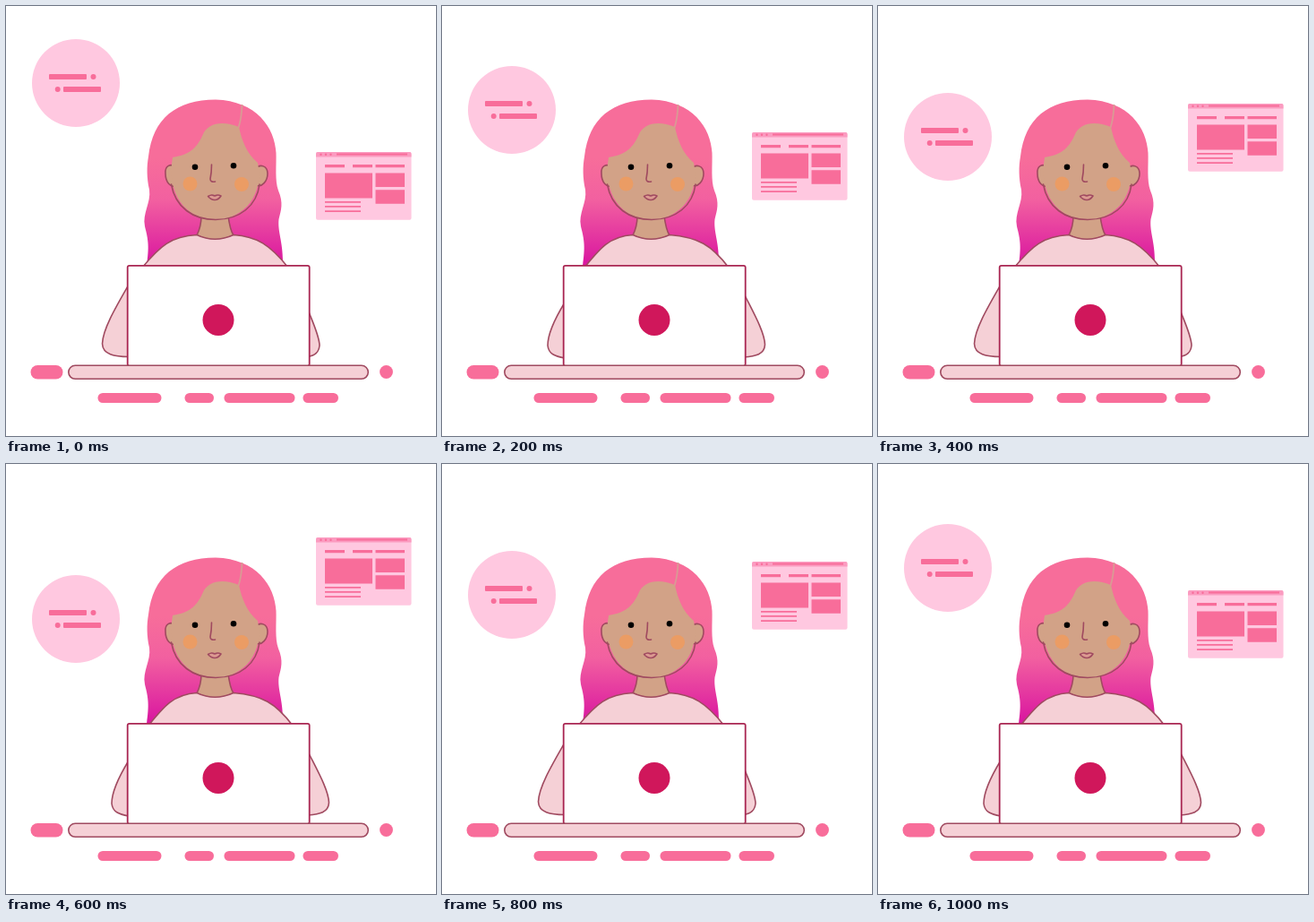
Write an HTML page that moves like this. It is 480 by 480 pixels and loops after 1.2 s.

```html
<!DOCTYPE html>
<html lang="en">
<head>
<meta charset="utf-8">
<title>Working at a laptop</title>
<style>
  html, body { margin: 0; width: 100%; height: 100%; overflow: hidden; background: #fff; }
  svg { display: block; width: 100%; height: 100%; }
  .pink { fill: #f86d9a; }
  .pale { fill: #ffc8e0; }
  .skin { fill: #d2a287; }
  .shirt { fill: #f5d0d6; }
  .line { stroke: #a04a60; stroke-width: 1.6; stroke-linejoin: round; stroke-linecap: round; }
</style>
</head>
<body>
<svg viewBox="0 0 480 480">
  <defs>
    <linearGradient id="dye" gradientUnits="userSpaceOnUse" x1="0" y1="170" x2="0" y2="286">
      <stop offset="0" stop-color="#f76d9a"/>
      <stop offset=".4" stop-color="#f260a0"/>
      <stop offset="1" stop-color="#da18a0"/>
    </linearGradient>
  </defs>

  <g id="bubble" class="pink">
    <circle class="pale" cx="78" cy="49" r="49"/>
    <rect x="48" y="39" width="42" height="6" rx="1"/>
    <circle cx="97.5" cy="42" r="3"/>
    <circle cx="57.7" cy="56" r="3"/>
    <rect x="64" y="53" width="42" height="6" rx="1"/>
  </g>

  <g id="page" class="pink">
    <rect class="pale" x="346" width="106.5" height="75.7" rx="2"/>
    <path fill="#fb9bc0" d="M346 5.500V2q0-2 2-2h102.500q2 0 2 2v3.500z"/>
    <path d="M369 1.500h79v2h-79zM356 14h22v3.200h-22zM387 14h22v3.200h-22zM412.500 14h32.500v3.200h-32.500z
      M356 23.500h53v28h-53zM412.500 23.500h32.500v15.500h-32.500zM412.500 42.200h32.500v15.500h-32.500z
      M356 55h40v1.800h-40zM356 60h40v1.800h-40zM356 65.200h40v1.800h-40z"/>
    <circle cx="351.500" cy="2.700" r="1.200"/>
    <circle cx="357" cy="2.700" r="1.200"/>
    <circle cx="362.500" cy="2.700" r="1.200"/>
  </g>

  <path fill="url(#dye)" d="M157 290C160 268 159 262 155 246C152 231 162 220 160 205C157 192 157 179 159 168
    C164 125 190 105 234 104.500C280 106 300 136 301.500 164C302 178 300 195 304 206
    C310 220 307 228 304.500 238C303 252 309 262 309 285L280 300H180Z"/>

  <path class="skin line" d="M218 234C218 243 216 250 213 256Q233 266 254 256C250 250 249 242 248 234Z"/>
  <path id="body" class="shirt line"/>
  <path id="arms" class="shirt line"/>

  <path class="skin line" d="M190 181C184 174 177 179 178 187C178 197 184 203 190 201"/>
  <path class="skin line" d="M278 182C284 175 292 179 292 187C292 195 286 203 279 200"/>
  <path class="skin" d="M186 169C206 166 214 157 220 143C225 132 240 127 260 135C263 150 269 165 281 175
    C288 209 267 238.500 234 238.500C200 238.500 179 209 186 169Z"/>
  <path class="line" fill="none" d="M184.500 199C189 225 209 238.500 234 238.500C261 238.500 280 223 283 199"/>
  <path fill="none" stroke="#d99a94" stroke-width="1.800" d="M263.500 110Q263 125 259.500 136"/>
  <circle cx="205.500" cy="198.500" r="8" fill="#eb9c64"/>
  <circle cx="263" cy="199" r="8" fill="#eb9c64"/>
  <circle cx="211" cy="179.700" r="3.300"/>
  <circle cx="254" cy="178.200" r="3.300"/>
  <path class="line" fill="none" d="M229.500 177Q229.500 186 228 193Q228 197 233.500 196"/>
  <path class="line" fill="#dc9a91" d="M225.500 212.500Q229 210.500 231 211.300Q233 212.500 235 211.300Q237 210.500 240 212Q237 216.500 233 216.500Q229 216.500 225.500 212.500Z"/>

  <rect x="135.700" y="289.800" width="203" height="112" rx="2" fill="#fff" stroke="#a92652" stroke-width="1.800"/>
  <circle cx="237" cy="350.500" r="17.500" fill="#d0175b"/>

  <rect class="shirt line" x="69.800" y="401.300" width="334.500" height="15" rx="7.500"/>
  <g class="pink">
    <rect x="27.500" y="401" width="36" height="15.500" rx="7.750"/>
    <circle cx="424.500" cy="408.500" r="7.400"/>
    <rect x="102.500" y="432" width="71" height="11" rx="5.500"/>
    <rect x="199.500" y="432" width="32.500" height="11" rx="5.500"/>
    <rect x="243.500" y="432" width="79" height="11" rx="5.500"/>
    <rect x="331.500" y="432" width="39.500" height="11" rx="5.500"/>
  </g>
</svg>
<script>
  const STEP = 200, STEPS = 6;
  const bubbleTops = [37, 67, 97, 124];
  const pageTops = [163, 141, 109, 82];
  const poses = [
    {
      body: "M213 255.500C184 257 172 268 152 292H315C295 267 280 257 254 255.500Q233 265 213 255.500Z",
      arms: "M137 311C122 337 108 361 107.500 377C108 389 121 391.500 137 391.500ZM337 339C342 352 350 369 350 379C349 387 345 390 337 391.500Z"
    },
    {
      body: "M213 255.500C187 257 176 271 159 292H320C301 267 286 258 254 255.500Q233 265 213 255.500Z",
      arms: "M137 331C126 349 118 365 118 379C119 389 127 391 137 393ZM337 321C348 343 360 364 360.500 378C360 389 350 391 337 392Z"
    }
  ];
  const el = id => document.getElementById(id);
  const moveTo = (id, y) => el(id).setAttribute("transform", `translate(0 ${y})`);

  function draw(now) {
    const step = Math.floor(now / STEP) % STEPS;
    const level = Math.min(step, STEPS - step); // down, then back up
    const pose = poses[step % 2];
    moveTo("bubble", bubbleTops[level]);
    moveTo("page", pageTops[level]);
    for (const id in pose) el(id).setAttribute("d", pose[id]);
  }

  let start;
  function tick(now) {
    start ??= now;
    draw(now - start);
    requestAnimationFrame(tick);
  }
  draw(0);
  requestAnimationFrame(tick);
</script>
</body>
</html>
```
